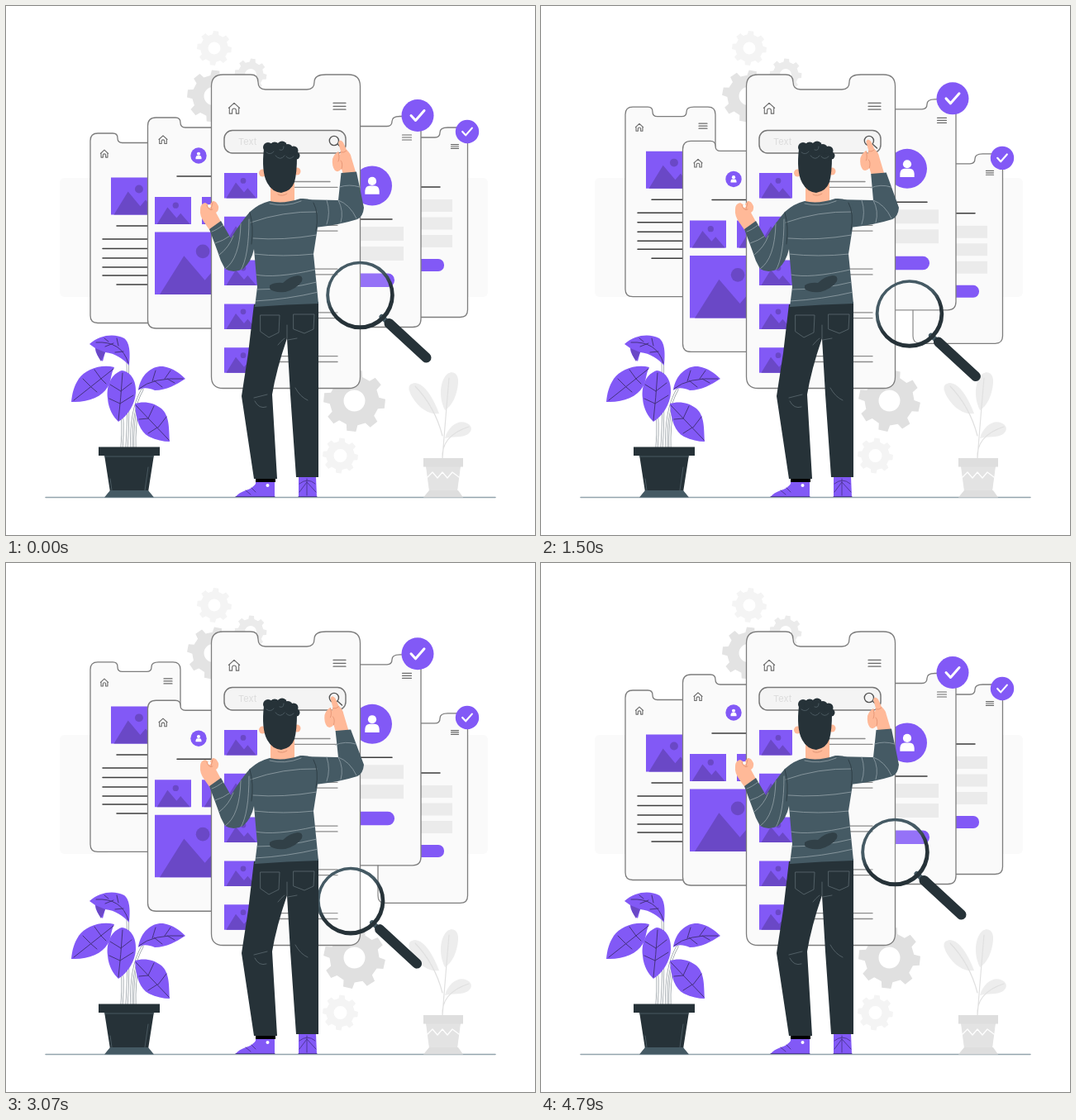
Animation, 640 px wide and 640 px high, one loop 4.87 s. Source, as an HTML page with a canvas:

```html
<!DOCTYPE html>
<html lang="en">
<head>
<meta charset="utf-8">
<title>App search</title>
<style>
html, body { margin: 0; width: 100%; height: 100%; overflow: hidden; background: #fff; }
canvas { display: block; width: 640px; height: 640px; }
</style>
</head>
<body>
<canvas id="stage" width="640" height="640"></canvas>
<script>
const ctx = document.getElementById('stage').getContext('2d');
const LOOP = 4870, STEP = 500 / 7, LAST = 67;
const PURPLE = '#8259f6', SHADE = '#6a48c6', DARK = '#263238', SLATE = '#455a64',
      SKIN = '#ffb998', PAPER = '#fafafa', EDGE = '#7d7d7d', BAR = '#ebebeb';

function fill(d, color) {
  ctx.fillStyle = color;
  ctx.fill(new Path2D(d));
}
function line(d, color, width = 1) {
  ctx.strokeStyle = color;
  ctx.lineWidth = width;
  ctx.stroke(new Path2D(d));
}
function disc(x, y, r, color) {
  ctx.fillStyle = color;
  ctx.beginPath();
  ctx.arc(x, y, r, 0, 7);
  ctx.fill();
}
function rect(x, y, w, h, color, r = 0) {
  ctx.fillStyle = color;
  ctx.beginPath();
  ctx.roundRect(x, y, w, h, r);
  ctx.fill();
}
function at(x, y, scale, draw) {
  ctx.save();
  ctx.translate(x, y);
  ctx.scale(scale, scale);
  draw();
  ctx.restore();
}
function rule(x1, x2, y, color = '#3c3c3c', width = 1.5) {
  line(`M${x1} ${y}H${x2}`, color, width);
}

function gear(x, y, r, hole, color, turn = 0) {
  const teeth = 8, root = r * 0.8;
  ctx.beginPath();
  for (let i = 0; i < teeth; i++) {
    for (const [offset, radius] of [[-0.29, root], [-0.19, r], [0.19, r], [0.29, root]]) {
      const a = turn + (i + offset) * Math.PI * 2 / teeth;
      ctx.lineTo(x + radius * Math.cos(a), y + radius * Math.sin(a));
    }
  }
  ctx.closePath();
  ctx.moveTo(x + hole, y);
  ctx.arc(x, y, hole, 0, 7);
  ctx.fillStyle = color;
  ctx.fill('evenodd');
}

function phone(x, y, w, h, r, n1, n2, depth) {
  const s = depth * 0.28, b = depth / 2;
  const d = `M${x + r} ${y}H${n1 - b}Q${n1} ${y} ${n1} ${y + b}Q${n1} ${y + depth} ${n1 + b} ${y + depth}
    H${n2 - b}Q${n2} ${y + depth} ${n2} ${y + b}Q${n2} ${y} ${n2 + b + s} ${y}
    H${x + w - r}q${r} 0 ${r} ${r}V${y + h - r}q0 ${r} ${-r} ${r}H${x + r}q${-r} 0 ${-r} ${-r}V${y + r}q0 ${-r} ${r} ${-r}Z`;
  fill(d, PAPER);
  line(d, EDGE, 1.3);
}
function house(x, y, scale) {
  at(x, y, scale, () =>
    line('M-7 0L0 -6.5L7 0M-6 -1V7H-2.5V3Q-2.5 .5 0 .5T2.5 3V7H6V-1', '#6b6b6b', 1.1 / scale));
}
function menu(x, y, w, gap) {
  for (const i of [-1, 0, 1]) rule(x - w / 2, x + w / 2, y + i * gap, '#6b6b6b', 1.2);
}
function user(x, y, r) {
  disc(x, y, r, PURPLE);
  at(x, y, r / 23.5, () => {
    disc(0, -5.5, 5, '#fff');
    fill('M-8.5 10V6Q-8 0 -3 0H3Q8 0 8.5 6V10Z', '#fff');
  });
}
function check(x, y, r) {
  disc(x, y, r, PURPLE);
  at(x, y, r / 19.5, () => line('M-8 0L-2.5 6L8 -6', '#fff', 3));
}
function picture(x, y, w, h) {
  rect(x, y, w, h, PURPLE);
  disc(x + w * 0.575, y + h * 0.31, h * 0.11, SHADE);
  const px = f => x + f * w, py = f => y + f * h;
  fill(`M${px(.06)} ${py(1)}L${px(.35)} ${py(.38)}L${px(.6)} ${py(.77)}L${px(.71)} ${py(.6)}L${px(.97)} ${py(1)}Z`, SHADE);
}

function farLeftPhone(y) {
  phone(102, y, 109, 229.5, 9, 135, 176, 11.5);
  house(119, y + 24.5, 0.66);
  menu(196, y + 23, 10, 3);
  picture(127, y + 53.5, 59, 45);
  [112, 128, 139.5, 151, 162, 172, 183].forEach((dy, i) =>
    i % 6 ? rule(117, 197, y + dy) : rule(134, 180, y + dy));
}
function leftPhone(y) {
  phone(171.5, y, 130, 255, 10, 211, 262, 12);
  house(190, y + 26.5, 0.72);
  user(233, y + 46, 9.7);
  rule(207, 260, y + 71);
  picture(180, y + 96, 44, 33);
  picture(237, y + 96, 44, 33);
  picture(180, y + 138.5, 101, 75.5);
}
function farRightPhone(y) {
  phone(450, y - 5, 108.5, 229.5, 9, 484, 525, 12);
  menu(543, y + 18, 9, 2.4);
  rule(485, 525, y + 67);
  for (const dy of [82, 103.5, 125]) rect(478, y + dy, 62, 15, BAR);
  rect(478, y + 154, 52, 15, PURPLE, 7);
  check(558, y, 14.2);
}
function rightPhone(y) {
  phone(372, y + 1, 130, 255, 10, 412, 467, 12);
  menu(485, y + 26.5, 11, 3);
  user(443, y + 85, 24);
  rule(418, 467, y + 125.5);
  rect(405, y + 134.5, 76, 17, BAR);
  rect(405, y + 158.5, 76, 17, BAR);
  rect(410, y + 191, 60, 16.5, PURPLE, 8);
  check(498, y, 19.5);
}
function mainPhone() {
  phone(248.5, 83, 180, 379.5, 14, 305, 373, 18);
  house(276, 123.5, 0.95);
  menu(403.5, 121.3, 15, 3.9);
  ctx.beginPath();
  ctx.roundRect(264, 150.5, 147, 27.5, 10);
  ctx.fillStyle = '#f4f4f4';
  ctx.fill();
  ctx.strokeStyle = '#777';
  ctx.lineWidth = 1.5;
  ctx.stroke();
  ctx.fillStyle = '#dcdcdc';
  ctx.font = '11px Inter, sans-serif';
  ctx.fillText('Text', 281, 168);
  line('M402.5 163a5.6 5.6 0 1 1 -11.2 0a5.6 5.6 0 1 1 11.2 0M401 167L406.5 172', '#555', 1.4);
  for (let i = 0; i < 5; i++) {
    const y = 202 + i * 52.8;
    picture(264, y, 40, 30.5);
    rule(330, i ? 401 : 392, y + 10.5, '#8c8c8c', 1.3);
    rule(330, 401, y + 17.3, '#8c8c8c', 1.3);
  }
}

function plant() {
  for (const d of ['M140 534Q143 505 138 475', 'M146 534Q149 490 147 428', 'M152 534Q150 490 165 464', 'M156 534Q155 510 160 484']) {
    line(d, '#8b949a', 3);
    line(d, '#fff', 1.6);
  }
  fill('M101 409C114 397 132 396 143 402C151 408 150 424 149 435C142 427 132 420 120 419L117 430Q108 422 108 414Z', PURPLE);
  fill('M108 414L120 419L115 430Q110 423 108 414Z', SHADE);
  fill('M131 437C114 433 96 440 88 451C82 460 80 469 79 479C99 480 116 473 123 461C128 453 126 447 131 437Z', PURPLE);
  fill('M140 441C128 445 121 458 123 475C124 488 130 497 136 503C148 495 156 482 157 468C158 452 150 442 140 441Z', PURPLE);
  fill('M160 465C163 445 177 435 190 436C202 438 210 444 217 451C206 458 194 465 180 465C172 462 166 461 160 465Z', PURPLE);
  fill('M156 481C157 501 162 515 173 521C182 525 190 527 198 527C197 510 198 496 188 487C178 479 166 478 156 481Z', PURPLE);
  line(`M109 407Q140 405 148 432M124 406L119 402M136 411L134 402M130 408L120 412M142 418L132 419
    M130 439L82 477M115 451L107 440M103 461L93 451M115 451L121 457M103 461L110 467
    M141 444Q139 475 136 501M139 466L126 458M138 481L125 475M139 466L152 456M138 481L154 471
    M161 463Q178 449 214 451M177 454L181 441M192 451L199 441M179 453L189 461M195 451L204 456
    M157 483L197 525M172 499L161 500M183 510L172 517M172 499L179 484M184 510L194 497`, '#45327f', 1);
  fill('M119 543H179L172 588H126Z', DARK);
  rect(112, 533.5, 74, 10.5, DARK);
  line('M119 545H179M126 572L128 586M172 558L168 586', '#52626a', 0.8);
  fill('M126 586H172L179 594.5H119Z', SLATE);
}
function palePlant() {
  const leaf = '#ededed';
  fill('M524 493C515 495 501 489 492 474C486 464 485 457 495 456C507 457 517 475 524 493Z', leaf);
  fill('M531 489C523 473 525 453 534 445C542 440 548 446 547 456C546 470 540 484 531 489Z', leaf);
  fill('M531 523C535 509 546 501 556 504C564 507 565 513 559 518C551 523 541 520 531 523Z', leaf);
  line('M528 548Q530 520 536 450M528 520Q519 485 495 460M528 548Q526 520 560 509', '#e0e0e0', 1.2);
  fill('M508 557H550L546 587H512Z', '#e3e3e3');
  rect(505, 547, 48, 10.5, '#dedede');
  line('M510 570L516 564L522 571L528 564L534 571L540 564L548 570', '#fff', 1.2);
  fill('M512 586H547L553 594.5H505Z', '#dedede');
}

// Position keys: step, x, y of the lens centre.
const LENS = [[0, 428.5, 350], [12, 451, 346.5], [29, 436.5, 399], [37, 425.5, 412],
              [49, 411.5, 401], [57, 419.5, 379], [LAST, 428.5, 350]];
function lensAt(n) {
  const count = LENS.length - 1;
  const key = i => {
    const wrap = Math.floor(i / count);
    const [t, x, y] = LENS[i - wrap * count];
    return [t + wrap * LAST, x, y];
  };
  let i = 0;
  while (i < count - 1 && n > LENS[i + 1][0]) i++;
  const [a, b, c, d] = [key(i - 1), key(i), key(i + 1), key(i + 2)];
  const span = c[0] - b[0], u = (n - b[0]) / span;
  return [1, 2].map(k => {
    const m0 = (c[k] - a[k]) / (c[0] - a[0]) * span, m1 = (d[k] - b[k]) / (d[0] - b[0]) * span;
    return b[k] + u * m0 + u * u * (3 * (c[k] - b[k]) - 2 * m0 - m1) + u ** 3 * (2 * (b[k] - c[k]) + m0 + m1);
  });
}
function magnifier([x, y]) {
  at(x, y, 1, () => {
    disc(0, 0, 39, 'rgba(255,255,255,.15)');
    line('M26 26L37 36', SLATE, 6);
    line('M35 34L80 75.5', DARK, 12);
    const tone = ctx.createLinearGradient(-20, -35, 15, 35);
    tone.addColorStop(0.35, SLATE);
    tone.addColorStop(0.6, DARK);
    ctx.fillStyle = tone;
    ctx.beginPath();
    ctx.arc(0, 0, 41.3, 0, 7);
    ctx.moveTo(36.6, -0.8);
    ctx.arc(-0.4, -0.8, 37, 0, 7);
    ctx.fill('evenodd');
  });
}

function rightArm(p) {
  const dx = -8.7 * p, dy = 1.4 * p;
  at(-12 * p, -1.5 * p, 1, () => {
    fill(`M408 204L406 197Q402 202 398 199Q394 194 395 185Q397 179 402 176L404 180L405 176L402 165
      Q404 160 408 165L412 174Q417 178 418 184L424 204Z`, SKIN);
    line('M402 177Q404 184 402 188M405 177Q409 178 412 175M406 197Q408 190 405 187', '#e2906f', 0.8);
  });
  const arm = `M355 234L402 235L${405.5 + dx} ${202 + dy}L${424 + dx} ${200.5 + dy}L433 244Q432 255 425 258Q403 265 374 268Z`;
  fill(arm, SLATE);
  line(`M388 235Q393 250 388 264M402 235Q409 248 405 262
    M${403.5 + dx * .7} ${219 + dy}Q${415 + dx * .7} 215 ${428 + dx * .7} 219M402 235Q416 240 424 257`, '#91a0a7', 0.8);
}

function person(p) {
  // Shoes and trousers
  fill('M302 575H325V594H278Q281 589 290 586Q299 583 302 578Z', PURPLE);
  rect(302, 570, 24, 6, '#000');
  disc(316.5, 580, 2, '#fff');
  fill('M354 569H375L376 594H354Z', PURPLE);
  line('M278 593.5H325M354 593.5H376M290 586L296 591M297 583L302 588M355 578Q365 570 374 578M364 572V592M355 588L364 576L375 588', '#4a3490', 0.9);
  fill(`M300 361L378 358V570H351L344 470L340 402Q327 440 322 470L328 572H300L285 472L293 420Z`, DARK);
  line(`M308 374H331L330 395L318 401L308 394ZM348 373H373L372 391L361 396L348 391Z
    M337 402Q333 405 329 410M340 402V386M341 404L352 402M300 474L316 470M301 478Q306 488 315 485M350 462Q356 473 365 477`, '#5d6b72', 0.8);

  // Left hand
  fill('M247 272L240 262Q234 254 235 246Q235 239 241 238L246 241L250 236Q254 235 257 242Q258 247 254 250L261 263Z', SKIN);
  disc(246, 242, 2, PAPER);
  line('M243 241Q246 249 250 246M250 238L248 246', '#e2906f', 0.8);

  rightArm(p);

  // Neck, ears and sweater
  fill('M320 214H349V238Q335 243 320 238Z', SKIN);
  line('M329 228Q334 231 340 227', '#d98c6c', 0.8);
  const body = `M319 236Q335 240 356 233Q371 232 376 240L377 268L372 300L378 360Q340 361 301 364L304 340L300 294
    Q297 309 287 318Q275 324 265 318Q259 308 256 297L246 270L260 260L272 281Q283 263 295 249Q306 239 319 236Z`;
  fill(body, SLATE);
  ctx.save();
  ctx.clip(new Path2D(body));
  line(`M296 262Q335 248 377 249M299 281Q335 284 376 277M300 300Q335 304 373 300M302 325Q325 330 374 319
    M302 343Q340 343 376 334M301 357Q340 355 378 346M319 239Q337 244 357 236
    M249 273Q255 271 264 264M253 287Q263 284 271 278M258 301Q270 292 275 278M265 318Q283 306 284 263
    M284 320Q294 303 294 258`, '#96a4aa', 0.8);
  ctx.restore();
  line('M295 250Q300 267 297 288M372 238Q379 251 375 272', '#2e3e46', 1);
  fill('M319 338Q325 334 335 335Q343 327 353 326Q360 326 358 333Q352 342 338 346Q323 347 319 342Z', '#314047');

  // Head
  disc(310.5, 202, 4.5, SKIN);
  disc(352, 200, 4.5, SKIN);
  fill('M312 173C310 190 311 205 316 214Q322 225 333 226Q345 224 349 213Q352 202 352 182L346 171Z', DARK);
  for (const [x, y, r] of [[317, 171, 6], [325, 171, 6.5], [334, 169.5, 6], [341, 173, 6], [348, 175, 5.5], [351, 181, 4.5], [346, 183, 5]])
    disc(x, y, r, DARK);
  line('M315 177Q320 181 324 176M326 181Q332 188 337 181M331 174Q336 176 336 170M339 182Q343 187 348 182', '#53626a', 0.8);
}

function swing(n, end) {
  return Math.max(0, Math.min(n / 29, 1, (end - n) / (end - 36.8)));
}

function draw(n) {
  const p = swing(n, LAST), q = swing(n, 64.4);
  ctx.fillStyle = '#fff';
  ctx.fillRect(0, 0, 640, 640);
  rect(65, 208, 60, 144, PAPER, 6);
  rect(535, 208, 48, 144, PAPER, 6);

  gear(252, 51, 21, 7.5, '#f4f4f4', 0.1);
  gear(404.5, 544, 21.5, 8, '#f4f4f4', 0.1);
  gear(296, 83, 19.5, 7, '#ebebeb', 0.15 - 0.12 * p);
  gear(250.5, 109, 31.5, 11, '#e3e3e3', 0.1 + 0.12 * p);
  gear(421.5, 477.5, 37.5, 13, '#e0e0e0', 0.1 + 0.15 * p);

  line('M48 594.5H592', '#93a4ad', 1.5);
  plant();
  palePlant();

  farLeftPhone(154 - 44 * q);
  leftPhone(135 + 39.3 * p);
  farRightPhone(152 + 44 * p);
  rightPhone(132.5 - 28.5 * p);
  mainPhone();
  magnifier(lensAt(n));
  person(p);
}

ctx.lineCap = ctx.lineJoin = 'round';
const start = performance.now();
function tick() {
  const t = (performance.now() - start) % LOOP;
  draw(Math.min(LAST, Math.floor((t + 5) / STEP)));
  requestAnimationFrame(tick);
}
tick();
</script>
</body>
</html>
```
